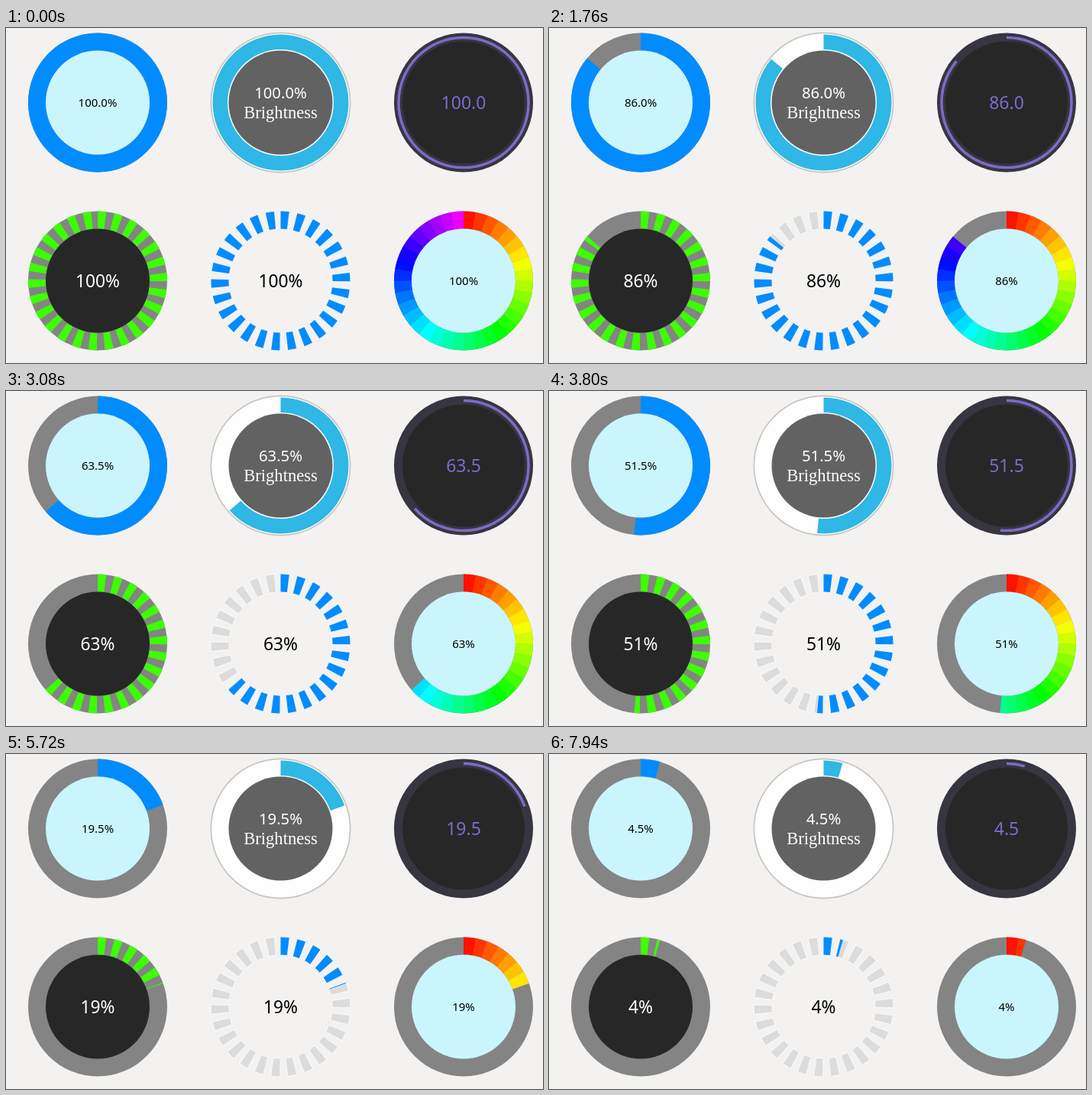
An HTML page with a canvas for the animation above (8000 ms loop, 703 by 438 pixels).

```html
<!DOCTYPE html>
<html lang="en">
<head>
<meta charset="utf-8">
<title>Dials</title>
<style>
  html, body { margin: 0; width: 100%; height: 100%; overflow: hidden; background: #f3f2f1; }
  canvas { display: block; width: 703px; height: 438px; }
</style>
</head>
<body>
<canvas id="stage"></canvas>
<script>
const W = 703, H = 438, LOOP = 8000, STEP = 60;
const TAU = Math.PI * 2;
const TOP = 97.5, BOTTOM = 330.5;
const COLS = [120, 359.5, 599];
const OUTER = 91, INNER = 68;
const SANS = '"Noto Sans", "Open Sans", sans-serif';
const SERIF = '"Liberation Serif", "Noto Serif", serif';
const BLUE = '#008cff', TRACK = '#848484', PALE = '#cbf5fd', DARK = '#272727';

const canvas = document.getElementById('stage');
const ctx = canvas.getContext('2d');
const ratio = window.devicePixelRatio || 1;
canvas.width = W * ratio;
canvas.height = H * ratio;
ctx.scale(ratio, ratio);

function valueAt(t) {
  if (t < 500) return 100;
  if (t < 980) return 99.5;
  if (t < 7280) {
    const n = Math.min(98, Math.floor((t - 980) / STEP));
    return 99 - n - (t >= 3080 ? 0.5 : 0);
  }
  if (t < 7760) return 0;
  return 1.5 + Math.floor((t - 7760) / STEP);
}

function disc(x, y, r, color) {
  ctx.fillStyle = color;
  ctx.beginPath();
  ctx.arc(x, y, r, 0, TAU);
  ctx.fill();
}

// Ring slice; from and to are fractions of a turn, clockwise from the top.
function slice(x, y, r0, r1, from, to, color) {
  if (to <= from) return;
  const a = from * TAU - TAU / 4, b = to * TAU - TAU / 4;
  ctx.fillStyle = color;
  ctx.beginPath();
  ctx.arc(x, y, r1, a, b);
  ctx.arc(x, y, r0, b, a, true);
  ctx.fill();
}

function label(text, x, y, size, color, font = SANS, weight = 500) {
  ctx.font = `${weight} ${size}px ${font}`;
  ctx.fillStyle = color;
  ctx.textAlign = 'center';
  ctx.fillText(text, x, y);
}

function dashes(x, y, limit, color) {
  const pitch = 13.9 / 360, len = 7.1 / 360;
  for (let i = 0; i < 26; i++) {
    const a = i * pitch;
    slice(x, y, INNER, OUTER, a, Math.min(a + len, limit), color);
  }
}

function emptyDashes(x, y, limit) {
  const pitch = 13.9 / 360, len = 7.1 / 360, pad = 0.7 / 360;
  for (let i = 0; i < 26; i++) {
    const a = Math.max(i * pitch, limit), b = i * pitch + len;
    if (a >= b) continue;
    slice(x, y, INNER - 1, OUTER + 1, a - pad, b + pad, '#fafafa');
    slice(x, y, INNER, OUTER, a, b, '#dcdcdc');
  }
}

function spectrum(x, y, limit) {
  const count = 36;
  for (let i = 0; i < count; i++) {
    const a = i / count;
    const b = Math.min(a + 1 / count + (i < count - 1 ? 0.0008 : 0), limit);
    slice(x, y, INNER, OUTER, a, b, `hsl(${300 * (i + 0.5) / count}, 100%, 50%)`);
  }
}

function plainDial(x, p, text) {
  disc(x, TOP, OUTER, TRACK);
  slice(x, TOP, INNER, OUTER, 0, p, BLUE);
  disc(x, TOP, INNER, PALE);
  label(text + '%', x, 103, 15, '#000');
}

function brightnessDial(x, p, text) {
  disc(x, TOP, 92, '#c8c5be');
  disc(x, TOP, 90.3, '#fdfefd');
  slice(x, TOP, 69.5, 89, 0, p, '#2fb7e6');
  disc(x, TOP, INNER, '#626262');
  label(text + '%', x, 92, 20.3, '#fff');
  label('Brightness', x, 118, 22.6, '#fff', SERIF, 400);
}

function lineDial(x, p, text) {
  disc(x, TOP, OUTER, '#373540');
  disc(x, TOP, 80, DARK);
  slice(x, TOP, 83.3, 86.8, 0, p, '#7d6bc8');
  label(text, x, 106, 23, '#7d6bc8');
}

function greenDial(x, p, text) {
  disc(x, BOTTOM, OUTER, TRACK);
  dashes(x, BOTTOM, p, '#3cff00');
  disc(x, BOTTOM, INNER, DARK);
  label(text, x, 339, 22.8, '#fff');
}

function dashDial(x, p, text) {
  emptyDashes(x, BOTTOM, p);
  dashes(x, BOTTOM, p, BLUE);
  label(text, x, 339, 22.8, '#000');
}

function spectrumDial(x, p, text) {
  disc(x, BOTTOM, OUTER, TRACK);
  spectrum(x, BOTTOM, p);
  disc(x, BOTTOM, INNER, PALE);
  label(text, x, 336, 15, '#000');
}

function draw(now) {
  const value = valueAt(now % LOOP);
  const p = value / 100;
  const exact = value.toFixed(1);
  const whole = Math.floor(value) + '%';

  ctx.fillStyle = '#f3f2f1';
  ctx.fillRect(0, 0, W, H);
  [plainDial, brightnessDial, lineDial].forEach((dial, i) => dial(COLS[i], p, exact));
  [greenDial, dashDial, spectrumDial].forEach((dial, i) => dial(COLS[i], p, whole));
}

let start = null;
function tick(now) {
  if (start === null) start = now;
  draw(now - start);
  requestAnimationFrame(tick);
}
draw(0);
requestAnimationFrame(tick);
</script>
</body>
</html>
```
